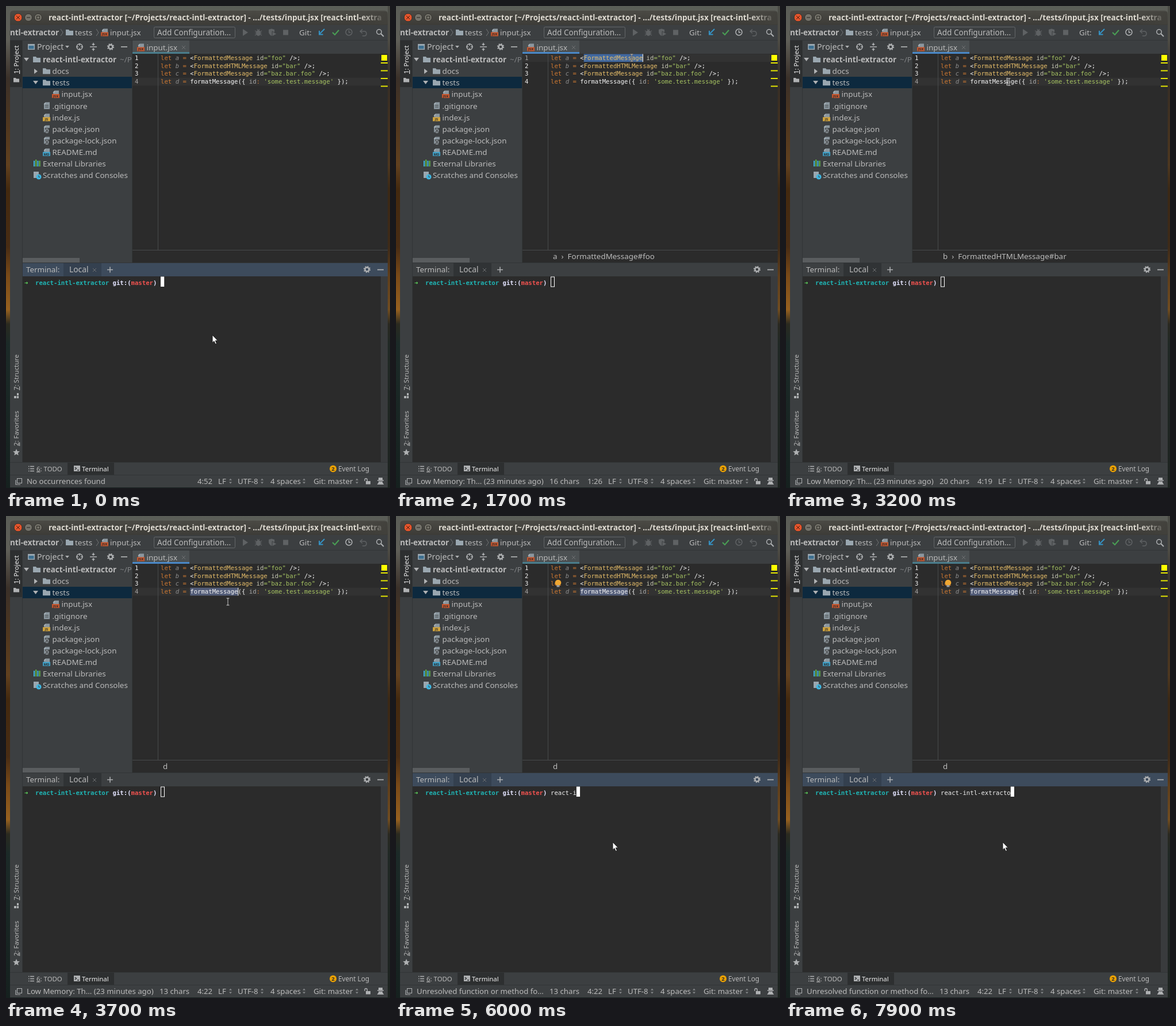
An HTML page for the animation above (8 s loop, 668x838 px).

```html
<!DOCTYPE html>
<html lang="en">
<head>
<meta charset="utf-8">
<title>Editor and terminal</title>
<style>
html, body { margin: 0; width: 100%; height: 100%; overflow: hidden; background: #2b2b2b; }
svg { display: block; }
text { font-family: "Noto Sans", sans-serif; font-size: 13.4px; fill: #bbbbbb; white-space: pre; }
.b { font-weight: 700; }
.s { font-size: 11.4px; }
.st { font-size: 13.2px; }
.m { font-family: "DejaVu Sans Mono", monospace; font-size: 10.65px; }
.ln { fill: none; stroke: #afb1b3; stroke-width: 1.5; }
</style>
</head>
<body>
<svg id="stage" width="668" height="838" viewBox="0 0 668 838" xmlns="http://www.w3.org/2000/svg"></svg>
<script>
const CH = 6.41, LH = 13.72, CODE_X = 269, CODE_Y = 83.5;
const GREY = '#afb1b3', DIM = '#5f6264', PANEL = '#3c3f41', DARK = '#2b2b2b';

const rect = (x, y, w, h, fill, more = '') =>
  `<rect x="${x}" y="${y}" width="${w}" height="${h}" fill="${fill}" ${more}/>`;
const text = (x, y, s, more = '') => `<text x="${x}" y="${y}" ${more}>${s}</text>`;
const path = (d, fill, more = '') => `<path d="${d}" fill="${fill}" ${more}/>`;
const line = (d, color = GREY, w = 1.5) =>
  `<path d="${d}" fill="none" stroke="${color}" stroke-width="${w}"/>`;
const circle = (x, y, r, fill, more = '') => `<circle cx="${x}" cy="${y}" r="${r}" fill="${fill}" ${more}/>`;
const esc = s => s.replace(/</g, '&lt;').replace(/>/g, '&gt;');
const mono = (x, y, parts, more = '') =>
  text(x, y, parts.map(([color, s, extra = '']) => `<tspan fill="${color}" ${extra}>${esc(s)}</tspan>`).join(''),
    'class="m" ' + more);

const folder = (x, y) => path(`M${x} ${y - 5}h5l1.5 2h6.5v8h-13z`, '#9aa7b0');
const cross = (x, y, color = '#6e7072') =>
  line(`M${x - 3} ${y - 3}l6 6M${x + 3} ${y - 3}l-6 6`, color, 1);
const gear = (x, y) =>
  circle(x, y, 3.5, 'none', `stroke="${GREY}" stroke-width="2.4"`) +
  circle(x, y, 5.2, 'none', `stroke="${GREY}" stroke-width="1.8" stroke-dasharray="2 2.08"`);

function file(x, y, label, color) {
  const page = path(`M${x + 5} ${y - 6.5}h7v12h-10v-9z`, '#8b979f') +
    path(`M${x + 1.5} ${y - 3}l3-3.5v3.5z`, '#b4bdc3');
  if (label === '{}') {
    return page + rect(x + 4, y - 2, 9, 9, PANEL) +
      text(x + 4, y + 5, '{}', 'style="font-size:8.5px;font-weight:700;fill:#b4bdc3"');
  }
  if (!label) return page + line(`M${x + 4} ${y - 1}h6M${x + 4} ${y + 2}h6`, PANEL, 1);
  return page + rect(x, y - 0.5, 13, 7, color) +
    text(x + 6.5, y + 5.4, label, 'text-anchor="middle" style="font-size:6px;font-weight:700;fill:#2b2b2b"');
}
const jsx = (x, y) => file(x, y, 'JSX', '#c8572f');
const updown = (x, y) => path(`M${x} ${y - 1.5}l2.5-3 2.5 3zM${x} ${y + 1.5}l2.5 3 2.5-3z`, '#85888a');
const side = (y, key, s, fill = '#bbbbbb') =>
  text(0, 0, `<tspan text-decoration="underline">${key}</tspan>${s}`,
    `class="s" style="fill:${fill}" transform="translate(22 ${y}) rotate(-90)"`);

function wallpaper() {
  const stops = [[0, '#5a5d57'], [.07, '#605f58'], [.15, '#3a3029'], [.25, '#50371f'], [.33, '#60401f'],
    [.38, '#43290f'], [.5, '#482c14'], [.56, '#7a4a18'], [.63, '#96601f'], [.66, '#2a2a20'],
    [.7, '#1c2a28'], [1, '#16211f']];
  return `<defs><linearGradient id="sky" x2="0" y2="1">` +
    stops.map(([o, c]) => `<stop offset="${o}" stop-color="${c}"/>`).join('') +
    `</linearGradient><linearGradient id="bar" x2="0" y2="1"><stop stop-color="#4b4a45"/>
    <stop offset="1" stop-color="#3c3b37"/></linearGradient>
    <linearGradient id="fade"><stop stop-color="#42413c" stop-opacity="0"/>
    <stop offset="1" stop-color="#42413c"/></linearGradient></defs>` +
    rect(0, 0, 668, 838, 'url(#sky)') + rect(664, 0, 4, 838, '#2b2824', 'opacity=".35"');
}

function titleBar() {
  return path('M7 34V14q0-6 6-6h645q6 0 6 6v20z', 'url(#bar)') +
    circle(21, 20, 7, '#e6552c', 'stroke="#31302c"') + cross(21, 20, '#4a1c0c') +
    circle(39, 20, 6.5, '#75736b', 'stroke="#31302c"') + line('M36 20h6', '#35342f', 1.3) +
    circle(56, 20, 6.5, '#75736b', 'stroke="#31302c"') +
    rect(53.5, 17.5, 5, 5, 'none', 'stroke="#35342f" stroke-width="1.2"') +
    text(74, 25, 'react-intl-extractor [~/Projects/react-intl-extractor] - .../tests/input.jsx [react-intl-extra',
      'class="b" style="font-size:13.5px;fill:#dfdbd2"') +
    rect(615, 10, 48, 22, 'url(#fade)');
}

function toolbar() {
  const sep = x => line(`M${x} 40l4 6-4 6`, '#717476', 1);
  return rect(7, 33, 657, 804, PANEL) +
    `<svg x="7" y="33" width="90" height="26">${text(0, 18, 'ntl-extractor', 'class="b"')}</svg>` +
    sep(95) + folder(104, 46) + text(120, 51, 'tests') + sep(157) + jsx(165, 46) + text(181, 51, 'input.jsx') +
    rect(257.5, 36.5, 141, 19, PANEL, 'stroke="#646769" rx="2"') +
    text(263, 50.5, 'Add Configuration...', 'style="font-size:13.6px"') +
    path('M412 40l9 6-9 6z', DIM) +
    `<ellipse cx="439" cy="47" rx="4" ry="5" fill="${DIM}"/>` +
    line('M433 43l12 8M445 43l-12 8M433 47h12M437 40l2 3 2-3', DIM, 1.2) +
    path('M457 41l5-1.5 5 1.5v5q-1 4-5 6-4-2-5-6z', DIM) + path('M463 44l8 4.5-8 4.5z', DIM, `stroke="${PANEL}"`) +
    rect(482, 41.5, 9, 9, DIM) +
    text(510, 51, 'Git:') +
    line('M554 40l-9 9M545 43v6.5h6.5', '#3592c4', 2) +
    line('M568 46l4 4 7-8', '#499c54', 2.2) +
    line('M617 44h6q4 0 4 4t-4 4h-3M620 40.5l-4 3.5 4 3.5', DIM, 1.5) +
    circle(649, 45, 4.2, 'none', 'class="ln"') + line('M652 48l5 5', GREY, 2);
}

function sidebar() {
  return rect(7, 59, 21, 82, '#2d2f30') + line('M28.5 59V793M7 59.5h657', '#323537', 1) +
    side(118, '1', ': Project', '#f0f0f0') + path('M13 125h4l1 1.5h5v6h-10z', GREY) +
    side(668, '7', ': Structure') +
    rect(14, 678, 4, 4, GREY) + rect(19, 678, 3, 4, GREY) + rect(19, 673, 3, 4, GREY) +
    side(765, '2', ': Favorites') +
    path('M18 770l1.7 4 4.3.3-3.3 2.8 1 4.2-3.7-2.3-3.7 2.3 1-4.2-3.3-2.8 4.3-.3z', GREY);
}

function project() {
  const rows = [
    [64, 'docs', 'dir'], [64, 'tests', 'dir'], [80, 'input.jsx', 'JSX', '#c8572f'], [64, '.gitignore', ''],
    [64, 'index.js', 'JS', '#d0a33c'], [64, 'package.json', '{}'], [64, 'package-lock.json', '{}'],
    [64, 'README.md', 'MD', '#3f9fc6']];
  let s = rect(38, 66, 12, 10, '#9aa7b0') + rect(39.5, 69, 9, 5.5, '#3c6f90') +
    text(54, 75.5, 'Project', 'style="font-size:14.2px"') + path('M103 69h7l-3.5 4z', GREY) +
    circle(128, 71, 5, 'none', 'class="ln"') + line('M128 65v4M128 73v4M122 71h4M130 71h4') +
    line('M146 71h12M152 64v4M152 78v-4', GREY, 1.5) + path('M149 66h6l-3 3zM149 76h6l-3-3z', GREY) +
    gear(182, 71) + line('M200 71h11', GREY, 1.7) +
    rect(29, 123, 190, 20, '#0d293e') +
    path('M31 90h9l-4.5 6z', GREY) + folder(47, 93) +
    `<svg x="29" y="83" width="190" height="20">${text(35, 14.8, 'react-intl-extractor', 'class="b"')}` +
    `${text(169, 14.8, '~/Projects', 'style="fill:#808385"')}</svg>` +
    path('M49 109l6 4.5-6 4.5z', GREY) + path('M47 130h9l-4.5 6z', GREY);
  rows.forEach(([x, name, kind, color], i) => {
    const y = 113.2 + i * 20.15;
    s += (kind === 'dir' ? folder(x, y) : file(x, y, kind, color)) + text(x + 16.5, y + 4.9, name);
  });
  s += [0, 1, 2, 3].map(i =>
    rect(48 + i * 3.2, i === 1 ? 267 : 269, 2, i === 1 ? 12 : 10, i % 2 ? '#62b543' : '#40b6e0')).join('') +
    text(64, 279, 'External Libraries') +
    path('M48 288h9v5l-4 6h-5z', '#9aa7b0') + circle(57, 297, 4.5, '#40b6e0') + line('M57 294.5v3h2', PANEL, 1) +
    text(64, 299, 'Scratches and Consoles') +
    rect(29, 438, 99, 8, '#5a5d5f');
  return s;
}

function bottom() {
  return line('M7 793.5h657M7 815.5h657', '#323537', 1) +
    rect(107, 794, 81, 21, '#2d2f30') +
    line('M39 800.5h1.5M42 800.5h7M39 804.5h1.5M42 804.5h7M39 808.5h1.5M42 808.5h7') +
    text(53, 808.5, '<tspan text-decoration="underline">6</tspan>: TODO', 'class="s"') +
    rect(118, 799, 11, 10, GREY) + line('M120 802l2.5 2-2.5 2M124 807h3', '#2d2f30', 1.3) +
    text(132, 808.5, 'Terminal', 'class="s" style="fill:#f0f0f0"') +
    circle(569, 804.5, 6, '#eda200') +
    text(569, 808, '2', 'text-anchor="middle" style="font-size:9.5px;font-weight:700;fill:#2b2b2b"') +
    text(578, 808.5, 'Event Log', 'class="s" style="font-size:11.7px"') +
    rect(19.5, 821.5, 8, 8, PANEL, `stroke="${GREY}"`) + line('M17 824v8h8', GREY, 1.2) +
    text(369, 830.5, 'LF', 'class="st"') + updown(388, 826) +
    text(403, 830.5, 'UTF-8', 'class="st"') + updown(443, 826) +
    text(460, 830.5, '4 spaces', 'class="st"') + updown(516, 826) +
    text(535, 830.5, 'Git: master', 'class="st"') + updown(608, 826) +
    rect(626, 826, 8, 5.5, GREY) + line('M624 826v-2q0-2.5 2.2-2.5t2.2 2.5v2', GREY, 1.3) +
    path('M648 824v-4h7v4h2v1.5h-11v-1.5zM648 826.5h7v2l2.5 3.5h-12l2.5-3.5z', GREY);
}

const frame = wallpaper() + titleBar() + toolbar() + sidebar() + project() + bottom();

const KEY = '#cc7832', TAG = '#e8bf6a', STR = '#a5c261', FG = '#f4f4f4', ATTR = '#c6c6b4';
const decl = name => [[KEY, 'let '], ['#8c8c8c', name, 'font-style="italic"'], [KEY, ' = ']];
const tag = (name, el, id) => [...decl(name), [FG, '<'], [TAG, el], [ATTR, ' id'], [STR, `="${id}"`], [FG, ' />;']];
const source = [
  tag('a', 'FormattedMessage', 'foo'),
  tag('b', 'FormattedHTMLMessage', 'bar'),
  tag('c', 'FormattedMessage', 'baz.bar.foo'),
  [...decl('d'), [FG, 'formatMessage({ '], ['#a8a8a8', 'id'], [KEY, ': '], [STR, "'some.test.message'"], [FG, ' });']]
];

const LOW = s => `Low Memory: ${s}... (23 minutes ago)`;
const states = [
  { t: 0, row: 4, pos: '4:52', msg: 'No occurrences found' },
  { t: 1100, row: 1, pos: '1:23', caret: 22 },
  { t: 1600, pos: '1:26', caret: 25, sel: [9, 25], chars: '16 chars' },
  { t: 1700, msg: LOW('Th'), crumb: 'a  ›  FormattedMessage#foo' },
  { t: 2000, row: 2, pos: '2:22', caret: 21, sel: null },
  { t: 2200, pos: '2:30', caret: 29, sel: [8, 29], chars: '20 chars', crumb: 'b  ›  FormattedHTMLMessage#bar' },
  { t: 3200, row: 4, pos: '4:19', caret: 18, sel: null },
  { t: 3400, msg: LOW('The IDE i'), chars: '', crumb: 'd' },
  { t: 3700, pos: '4:22', caret: 21, sel: [8, 21], chars: '13 chars', msg: LOW('Th') },
  { t: 3900, bulb: true },
  { t: 4200, msg: 'Unresolved function or method fo...' }
];
const stateAt = t => Object.assign({}, ...states.filter(s => s.t <= t));

function editor(s, focus, active) {
  const top = n => CODE_Y + (n - 1) * LH;
  let out = rect(220, 60, 444, 23, PANEL) + rect(220, 60, 99, 23, '#4b5052') +
    rect(220, 80, 99, 3, active ? '#4a88c7' : '#4a7d8c') +
    jsx(228, 72) + text(244.5, 76.5, 'input.jsx') + cross(309, 72) +
    rect(220, 83, 444, 363, DARK) +
    rect(220, top(s.row), 432, LH, '#323232') +
    line('M264.5 83V424M220 424.5h444', '#484a4b', 1) + line('M219.5 60V446', '#323537', 1);
  if (s.sel) {
    const [a, b] = s.sel;
    out += rect(CODE_X + a * CH, top(s.row), (b - a) * CH, LH, s.row === 4 ? '#525c78' : '#41689f');
  }
  source.forEach((parts, i) => {
    const y = top(i + 1) + 10.5, on = i + 1 === s.row;
    out += mono(224, y, [[on ? '#a4a3a3' : '#f0f0f0', String(i + 1)]]) + mono(CODE_X, y, parts);
  });
  if (focus) out += rect(CODE_X + s.caret * CH - 0.5, top(s.row), 1.3, LH, '#dddddd');
  if (s.bulb) out += circle(282, 116, 5.3, '#f0a732') + rect(279.5, 120, 5, 3.5, '#9b9da0');
  out += rect(653, 85, 10, 10, '#ffff00');
  [98, 111.5, 125, 138.5].forEach((y, i) =>
    out += rect(652, y, 12, 2, i === 1 && s.row === 2 && s.sel ? '#d8d8d8' : '#e6e600'));
  return out + (s.crumb ? text(273, 440, s.crumb) : '');
}

const COMMAND = 'react-intl-extractor';
const strokes = [5000, 5100, 5300, 5700, 6000, 6200, 6400, 6700, 6900, 7300, 7400, 7800, 7900];

function terminal(t, focus, active) {
  // Every second stroke brings two letters.
  const typed = COMMAND.slice(0, Math.floor(1.5 * strokes.filter(x => x <= t).length));
  const x = CODE_X + typed.length * CH;
  return rect(29, 447, 635, 23, active ? '#3d4b5c' : PANEL) +
    rect(100, 447, 66, 23, active ? '#34404f' : '#303335') + line('M29 446.5h635', '#323537', 1) +
    text(35, 463, 'Terminal:') + text(110, 463, 'Local', 'style="font-size:13.8px"') + cross(154, 459) +
    line('M176 458.5h10M181 453.5v10', GREY, 1.5) + gear(628, 458) + line('M646 458.5h11', GREY, 1.7) +
    rect(29, 470, 635, 323, DARK) + rect(652, 470, 12, 323, '#393b3d') +
    mono(32, 484.5, [['#5fd75f', '➜']], 'font-weight="700"') +
    mono(51, 484.5, [['#1fb5b5', 'react-intl-extractor '], ['#e4e4ff', 'git:('], ['#f0524f', 'master'],
      ['#e4e4ff', ')']], 'font-weight="700"') +
    mono(CODE_X, 484.5, [['#f0f0f0', typed]]) +
    (focus ? rect(x, 470.5, 6.2, 17.5, '#ffffff')
      : rect(x + 0.5, 471, 6, 17, 'none', 'stroke="#ffffff"'));
}

// Pointer stops: time, x, y
const stops = [[100, 359, 572], [1000, 410, 90], [1900, 410, 90], [2000, 404, 104], [2100, 404, 104],
  [2400, 394, 116], [3100, 394, 116], [3200, 388, 132], [3600, 388, 132], [3700, 386, 149],
  [3800, 386, 149], [4200, 377, 567]];

function pointer(t) {
  let i = stops.findIndex(s => s[0] > t);
  if (i < 0) i = stops.length - 1;
  i = Math.max(i, 1);
  const [t0, x0, y0] = stops[i - 1], [t1, x1, y1] = stops[i];
  const u = Math.min(1, Math.max(0, (t - t0) / (t1 - t0)));
  const e = u * u * (3 - 2 * u);
  const bend = i === 1 ? 248 * e * (1 - e) : 0;
  const x = x0 + (x1 - x0) * e + bend, y = y0 + (y1 - y0) * e;
  const beam = 'M-2.5-6h5M0-6v12M-2.5 6h5';
  const shape = y < 424
    ? line(beam, '#111111', 2.2) + line(beam, '#e8e8e8', 1)
    : path('M0 0v13.5l3-2.8 2.2 5 2.3-1-2.2-4.8h4.2z', '#ffffff', 'stroke="#1a1a1a" stroke-width="1"');
  return `<g transform="translate(${x.toFixed(1)} ${y.toFixed(1)})">${shape}</g>`;
}

function dynamic(t) {
  const s = stateAt(t);
  const typing = t < 1100 || t >= 4400;
  const headerLit = t < 1400 || t >= 4400; // the panels recolour a little after the click
  const clock = t >= 1700 && t < 4600 ? GREY : DIM;
  return circle(596.5, 45.5, 5.5, 'none', `stroke="${clock}" stroke-width="1.5"`) +
    line('M596.5 42v4h3', clock, 1.4) +
    editor(s, !typing, !headerLit) + terminal(t, typing, headerLit) +
    text(36, 830.5, s.msg, 'class="st"') + text(267, 830.5, s.chars || '', 'class="st"') +
    text(333, 830.5, s.pos, 'class="st"') + pointer(t);
}

const stage = document.getElementById('stage');
stage.innerHTML = frame + '<g id="live"></g>';
const live = document.getElementById('live');
const start = performance.now();
let shown = -1;

function tick(now) {
  const t = Math.floor(Math.max(0, now - start) % 8000 / 100) * 100;
  if (t !== shown) live.innerHTML = dynamic(shown = t);
  requestAnimationFrame(tick);
}
tick(start);
</script>
</body>
</html>
```
